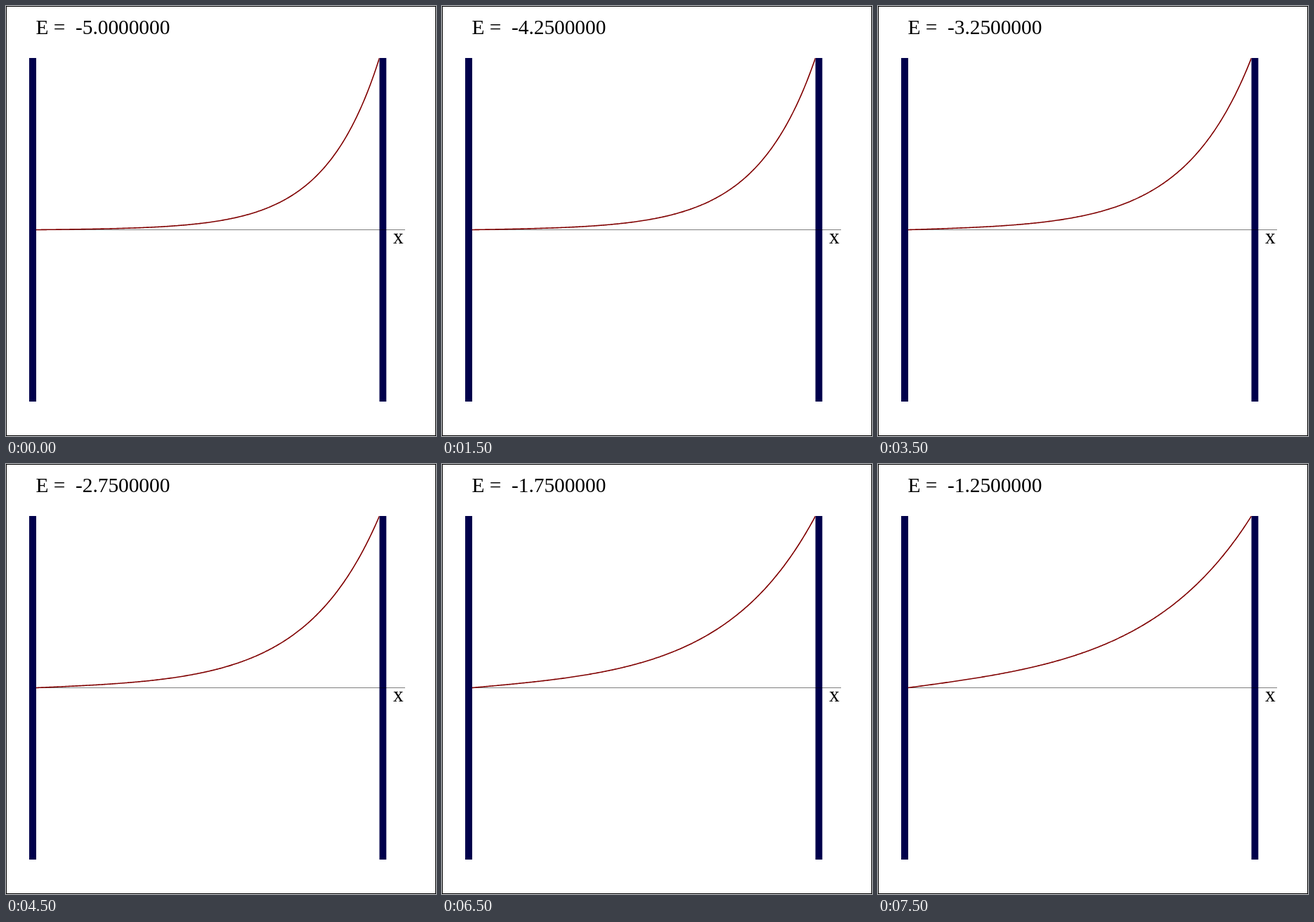
Animation, 612 px wide and 612 px high, one loop 8000 ms. Source, as an HTML page with a canvas:

```html
<!DOCTYPE html>
<html lang="en">
<head>
<meta charset="utf-8">
<title>Wave function in a well</title>
<style>
  html, body { margin: 0; width: 100%; height: 100%; overflow: hidden; background: #fff; }
  canvas { display: block; }
</style>
</head>
<body>
<canvas id="stage" width="612" height="612"></canvas>
<script>
const ctx = document.getElementById('stage').getContext('2d');
const LOOP = 8000, STEP = 500;
const LEFT = 42.5, RIGHT = 531.5, TOP = 74, AXIS = 318.5;
const FONT = '29.33px "Liberation Serif", "Times New Roman", Times, serif';

// Solution of psi'' = -2E psi on [0, 2] for E < 0, scaled to 1 at the right wall
function psi(u, energy) {
  const k = 2 * Math.sqrt(-2 * energy);
  return Math.sinh(k * u) / Math.sinh(k);
}

function drawCurve(energy) {
  ctx.save();
  ctx.beginPath();
  ctx.rect(LEFT, TOP, RIGHT - LEFT, 489);
  ctx.clip();
  ctx.beginPath();
  const n = 300;
  for (let i = 0; i <= n; i++) {
    const u = i / n;
    ctx.lineTo(LEFT + u * (RIGHT - LEFT), AXIS - psi(u, energy) * (AXIS - TOP));
  }
  ctx.strokeStyle = '#800000';
  ctx.lineWidth = 1.6;
  ctx.lineJoin = 'round';
  ctx.stroke();
  ctx.restore();
}

function draw(time) {
  const energy = -5 + 0.25 * Math.floor((time % LOOP) / STEP);

  ctx.fillStyle = '#fff';
  ctx.fillRect(0, 0, 612, 612);
  ctx.strokeStyle = '#000';
  ctx.lineWidth = 1;
  ctx.strokeRect(0.5, 0.5, 611, 611);

  ctx.fillStyle = '#00004c';
  ctx.fillRect(33, 74, 10, 489);
  ctx.fillRect(531.5, 74, 9.8, 489);

  ctx.fillStyle = 'rgba(0, 0, 0, 0.5)';
  ctx.fillRect(43, 318, 525, 1);

  drawCurve(energy);

  ctx.fillStyle = '#000';
  ctx.font = FONT;
  ctx.fillText('E =  ' + energy.toFixed(7), 42.5, 40);
  ctx.fillText('x', 551, 338);
}

const start = performance.now();
function tick() {
  draw(performance.now() - start);
  requestAnimationFrame(tick);
}
tick();
</script>
</body>
</html>
```
